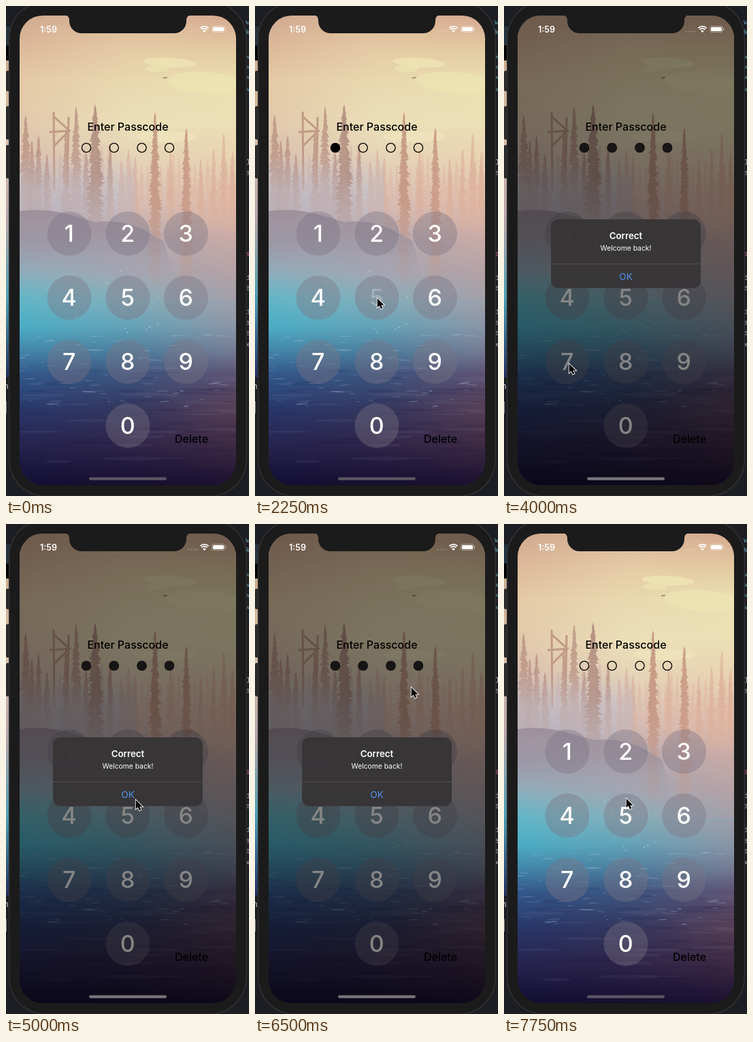
These frames come from a looping animation (357 by 719 pixels, 8 s). An HTML page with a canvas:

```html
<!DOCTYPE html>
<html lang="en">
<head>
<meta charset="utf-8">
<title>Passcode screen</title>
<style>
html, body { margin: 0; width: 100%; height: 100%; overflow: hidden; background: #1b1c20; }
canvas { display: block; width: 357px; height: 719px; }
</style>
</head>
<body>
<canvas id="stage"></canvas>
<script>
const W = 357, H = 719, LOOP = 8000, STEP = 250;
const SCALE = window.devicePixelRatio || 1;
const SANS = 'Inter, Roboto, sans-serif';
const BODY = '#1b1b1b';
const KEY_X = [93, 179, 264.5], KEY_Y = [334, 428, 522, 616];
const DOT_X = [118, 158.7, 199.5, 240];

// Each row: y, then the colour at the left, middle and right of the screen.
const SKY_AND_WATER = [
  [14, 'd0aa90', 'dab698', 'd5a991'],
  [60, 'dcb99a', 'e4caa4', 'e3c8a0'],
  [110, 'e4caa6', 'e9d8ae', 'ebdfb2'],
  [170, 'e2c8ac', 'ebdfb8', 'ecdfb4'],
  [230, 'd6bdb0', 'e5d2b8', 'e8d0b2'],
  [290, 'b9b2bd', 'd2bfbd', 'dfbdad'],
  [340, 'a3a0ae', 'b5a9b0', 'c9aaa6'],
  [390, '8eaebd', 'a4a6b2', 'b5a2a6'],
  [430, '60b6c6', '86afbb', 'a29fa9'],
  [470, '4badc6', '63a2b7', '8995a7'],
  [505, '4286aa', '4c7f9f', '757c94'],
  [540, '32578a', '3c5580', '5d5172'],
  [590, '28376b', '33375f', '573f56'],
  [640, '272550', '30264a', '402c45'],
  [703, '120e32', '150e30', '1b1030']
];

// Pointer: time, x, y of the tip.
const POINTER = [
  [250, 346, 96], [750, 255, 205], [1250, 171, 326], [1500, 174, 331],
  [1750, 174, 331], [2250, 179, 428], [2500, 179, 428], [2750, 179, 522],
  [3000, 176, 523], [3500, 95, 524], [4250, 95, 524], [5000, 190, 404],
  [5250, 192, 400], [6250, 229, 242], [6500, 229, 239], [7250, 179, 402], [8000, 179, 402]
];
const PRESSES = [[1500, 2], [2250, 5], [2750, 8], [3750, 7]];
const ALERT_FROM = 4000, ALERT_TO = 7500;

const stage = document.getElementById('stage');
const scenery = document.createElement('canvas');
let g;

function open(canvas) {
  canvas.width = W * SCALE;
  canvas.height = H * SCALE;
  const context = canvas.getContext('2d');
  context.scale(SCALE, SCALE);
  return context;
}

let seed = 7;
function random(low = 0, high = 1) {
  seed = (seed * 16807) % 2147483647;
  return low + (high - low) * seed / 2147483647;
}

const mix = (a, b, k) => a + (b - a) * k;
const channels = hex => [0, 2, 4].map(i => parseInt(hex.substr(i, 2), 16));

function between(rows, at) {
  let i = 0;
  while (i < rows.length - 2 && at >= rows[i + 1][0]) i++;
  const a = rows[i], b = rows[i + 1];
  return [a, b, (at - a[0]) / (b[0] - a[0])];
}

function rect(x, y, w, h, color) {
  g.fillStyle = color;
  g.fillRect(x, y, w, h);
}

function rounded(x, y, w, h, radius, color) {
  g.beginPath();
  g.roundRect(x, y, w, h, radius);
  g.fillStyle = color;
  g.fill();
}

function ellipse(x, y, rx, ry, color, tilt = 0) {
  g.beginPath();
  g.ellipse(x, y, rx, ry, tilt, 0, Math.PI * 2);
  g.fillStyle = color;
  g.fill();
}

function text(string, x, y, size, color, weight = 400, align = 'center', family = SANS) {
  g.font = `${weight} ${size}px ${family}`;
  g.textAlign = align;
  g.fillStyle = color;
  g.fillText(string, x, y);
}

function gradient(x0, y0, x1, y1, colors) {
  const fade = g.createLinearGradient(x0, y0, x1, y1);
  colors.forEach((color, i) => fade.addColorStop(i / (colors.length - 1), color));
  return fade;
}
const vertical = (y0, y1, ...colors) => gradient(0, y0, 0, y1, colors);
const horizontal = (x0, x1, ...colors) => gradient(x0, 0, x1, 0, colors);

function tree(x, top, base, halfWidth, rgb, alpha) {
  g.beginPath();
  g.rect(x - 1.2, top, 2.4, base - top);
  for (let y = top + 4; y < base - 8; y += 5) {
    const reach = 1 + halfWidth * Math.pow((y - top) / (base - top), 0.6);
    g.moveTo(x, y - 8);
    g.lineTo(x + reach * random(0.6, 1.1), y + random(2, 6));
    g.lineTo(x - reach * random(0.6, 1.1), y + random(2, 6));
    g.closePath();
  }
  g.fillStyle = vertical(top, base, `rgba(${rgb},${alpha})`, `rgba(${rgb},${alpha * 0.85})`, `rgba(${rgb},0)`);
  g.fill();
}

function drawDesktop() {
  rect(0, 0, W, H, '#1c1e24');
  rect(0, 30, 6, 28, '#263440');
  rect(0, 58, 6, 22, '#050505');
  rect(0, 80, 6, 465, vertical(80, 545, '#cbab8e', '#d8bda6', '#b5a3a8', '#4e9fb4', '#23305f'));
  text('n', -3, 562, 11, '#ddd', 400, 'left');
  rect(0, 580, 1, 18, '#888');
  const code = { w: [27, 77, 92, 107, 125], k: [42], J: [233], a: [248, 468], s: [367], d: [402, 452], e: [417, 483], x: [500] };
  for (const [letter, rows] of Object.entries(code))
    for (const y of rows)
      text(letter, 352, y, 11, y < 130 ? '#5f9fb0' : y === 367 ? '#c75a94' : '#a9a3b8', 400, 'left', '"DejaVu Sans Mono", monospace');
}

function drawBody() {
  for (const [y, h] of [[95, 30], [147, 49], [204, 49]]) rounded(0, y, 8, h, 2, '#2a2a2b');
  rounded(4, -7, 350, 727, 54, '#303031');
  rounded(5.5, -5.5, 347, 724, 53, BODY);
}

function drawGradient() {
  for (let y = 14; y < 703; y++) {
    const [a, b, k] = between(SKY_AND_WATER, y);
    const row = [1, 2, 3].map(i => {
      const to = channels(b[i]);
      return `rgb(${channels(a[i]).map((c, n) => mix(c, to[n], k))})`;
    });
    rect(20, y, 318, 1.5, horizontal(20, 338, ...row));
  }
}

function drawSky() {
  ellipse(241, 83, 39, 7, 'rgba(239,230,180,.75)', 0.06);
  ellipse(294, 113, 58, 16, 'rgba(239,230,178,.6)', 0.08);
  ellipse(235, 192, 46, 8, 'rgba(243,232,192,.45)');
  ellipse(222, 92, 18, 5, 'rgba(239,230,178,.6)');
  g.strokeStyle = '#6e5b4c';
  g.lineWidth = 1.2;
  g.beginPath();
  g.moveTo(231, 106); g.lineTo(234, 105); g.lineTo(237, 105);
  g.stroke();
}

function drawForest() {
  for (let x = 22; x < 340; x += 8)
    tree(x + random(-3, 3), random(205, 255), 335, random(6, 9), x < 150 ? '200,172,166' : '224,180,158', 0.5);
  for (const [x, top] of [[180, 212], [190, 224], [242, 213], [286, 227], [305, 212], [320, 189], [333, 216], [170, 232]])
    tree(x, top, 350, 9, '218,171,148', 0.6);
  for (const [x, top, base, halfWidth] of [
    [29, 163, 330, 14], [48, 193, 325, 10], [88, 185, 325, 9], [103, 150, 325, 12],
    [153, 206, 330, 8], [60, 220, 325, 9], [118, 218, 325, 9], [38, 200, 325, 9]
  ]) tree(x, top, base, halfWidth, '184,144,128', 0.8);

  g.strokeStyle = '#c09a85';
  g.lineWidth = 3;
  g.beginPath();
  for (const [x0, y0, x1, y1] of [[70, 155, 71, 270], [92, 163, 90, 270], [64, 185, 95, 183], [71, 163, 92, 182], [71, 205, 90, 186]]) {
    g.moveTo(x0, y0);
    g.lineTo(x1, y1);
  }
  g.stroke();

  rect(20, 215, 170, 110, vertical(215, 325, 'rgba(190,188,202,0)', 'rgba(190,190,204,.5)', 'rgba(182,180,194,.4)'));
  tree(131, 148, 345, 18, '172,134,122', 0.85);
  tree(219, 159, 415, 14, '192,144,124', 0.85);
  tree(265, 182, 420, 13, '198,148,128', 0.85);

  g.beginPath();
  g.moveTo(20, 301);
  g.bezierCurveTo(70, 294, 105, 311, 132, 317);
  g.bezierCurveTo(178, 313, 200, 326, 232, 346);
  g.lineTo(250, 415);
  g.lineTo(20, 415);
  g.fillStyle = vertical(298, 400, 'rgba(154,140,152,.9)', 'rgba(154,146,160,.6)', 'rgba(154,160,175,0)');
  g.fill();
}

function drawWater() {
  rect(20, 434, 318, 1.5, 'rgba(115,175,192,.45)');
  for (let i = 0; i < 45; i++)
    ellipse(random(20, 338), random(525, 690), random(15, 48), random(1, 3), 'rgba(20,20,70,.12)');
  for (let i = 0; i < 22; i++)
    ellipse(random(20, 338), random(530, 670), random(18, 50), random(1, 3), 'rgba(140,135,175,.1)');
  for (let i = 0; i < 75; i++) {
    const y = 482 + 115 * Math.pow(random(), 1.5);
    ellipse(random(20, 338), y, random(2, 12), random(0.4, 1.1), `rgba(165,190,216,${random(0.12, 0.4)})`, random(-0.08, 0.08));
  }
  for (let i = 0; i < 12; i++) ellipse(random(90, 290), random(365, 480), 0.8, 0.8, 'rgba(235,230,230,.7)');
}

function drawScenery() {
  g = open(scenery);
  drawDesktop();
  drawBody();
  g.save();
  g.beginPath();
  g.roundRect(20, 14, 318, 689, 34);
  g.clip();
  drawGradient();
  drawSky();
  drawForest();
  drawWater();
  g.restore();
}

function drawKeys(pressed) {
  text('Enter Passcode', 179, 183, 16, '#000', 450);
  for (let digit = 0; digit < 10; digit++) {
    const x = digit ? KEY_X[(digit - 1) % 3] : KEY_X[1];
    const y = digit ? KEY_Y[Math.floor((digit - 1) / 3)] : KEY_Y[3];
    ellipse(x, y, 32.5, 32.5, 'rgba(122,115,130,.4)');
    text(digit, x - 0.3, y + 12.2, 34, `rgba(255,255,255,${digit === pressed ? 0.25 : 1})`, 500);
  }
  text('Delete', 272.5, 641, 16, '#000', 450);
}

function drawDots(count) {
  g.lineWidth = 1.3;
  g.strokeStyle = '#000';
  DOT_X.forEach((x, i) => {
    g.beginPath();
    g.arc(x, 208, 6.6, 0, Math.PI * 2);
    g.fillStyle = '#000';
    if (i < count) g.fill();
    g.stroke();
  });
}

function drawStatus(alertShown) {
  g.beginPath();
  g.moveTo(86, 13);
  g.quadraticCurveTo(93, 14, 93, 21);
  g.arcTo(93, 40, 113, 40, 18);
  g.arcTo(265, 40, 265, 20, 18);
  g.lineTo(265, 21);
  g.quadraticCurveTo(265, 14, 272, 13);
  g.fillStyle = BODY;
  g.fill();

  text('1:59', 62.5, 38.8, 12.5, '#fff', 600);
  for (let x = 268; x < 281; x += 4) ellipse(x, 37.5, 1.1, 1.1, `rgba(255,255,255,${alertShown ? 0.3 : 0.2})`);
  g.strokeStyle = '#fff';
  g.lineWidth = 1.9;
  for (const radius of [5.6, 8.6]) {
    g.beginPath();
    g.arc(291.5, 38.5, radius, -Math.PI * 0.75, -Math.PI * 0.25);
    g.stroke();
  }
  g.beginPath();
  g.moveTo(291.5, 39);
  g.arc(291.5, 39, 3.3, -Math.PI * 0.75, -Math.PI * 0.25);
  g.fillStyle = '#fff';
  g.fill();
  g.lineWidth = 0.8;
  g.strokeStyle = 'rgba(255,255,255,.5)';
  g.beginPath();
  g.roundRect(302.6, 29.6, 18.8, 8.9, 2.6);
  g.stroke();
  rounded(304, 31, 16, 6.1, 1.5, '#fff');
  rect(322.2, 32.6, 1, 3, 'rgba(255,255,255,.5)');
  rounded(122, 691.5, 114, 4.2, 2.1, alertShown ? '#77757a' : '#5c5563');
}

function drawAlert() {
  rounded(20, 14, 318, 689, 34, 'rgba(0,0,0,.48)');
  for (const x of DOT_X) ellipse(x, 208, 7, 7, '#171515');
  rounded(69, 313, 220, 101, 11, 'rgba(55,53,54,.97)');
  text('Correct', 179, 342, 13.3, '#fff', 600);
  text('Welcome back!', 179, 358.8, 10.3, '#fff');
  rect(69, 378, 220, 0.8, '#555354');
  text('OK', 179, 402, 13.6, '#5593f2');
}

function drawPointer(time) {
  if (time < POINTER[0][0]) return;
  const [a, b, k] = between(POINTER, time);
  g.save();
  g.translate(mix(a[1], b[1], k) + 0.7, mix(a[2], b[2], k) + 1);
  g.scale(0.86, 0.86);
  g.beginPath();
  for (const [x, y] of [[0, 0], [0, 15.5], [3.6, 12.2], [6.2, 18], [9, 16.7], [6.5, 11.2], [11.5, 11.2]]) g.lineTo(x, y);
  g.closePath();
  g.lineWidth = 2;
  g.strokeStyle = '#fff';
  g.fillStyle = '#000';
  g.stroke();
  g.fill();
  g.restore();
}

function draw(time) {
  const press = PRESSES.find(([at]) => at === time);
  const alertShown = time >= ALERT_FROM && time < ALERT_TO;
  const entered = time < ALERT_TO ? PRESSES.filter(([at]) => time > at).length : 0;
  g.drawImage(scenery, 0, 0, W, H);
  drawKeys(press && press[1]);
  drawDots(entered);
  if (alertShown) drawAlert();
  drawStatus(alertShown);
  drawPointer(time);
}

drawScenery();
g = open(stage);
const start = performance.now();
function tick() {
  const elapsed = (performance.now() - start) % LOOP;
  draw(Math.floor(elapsed / STEP) * STEP);
  requestAnimationFrame(tick);
}
tick();
</script>
</body>
</html>
```
